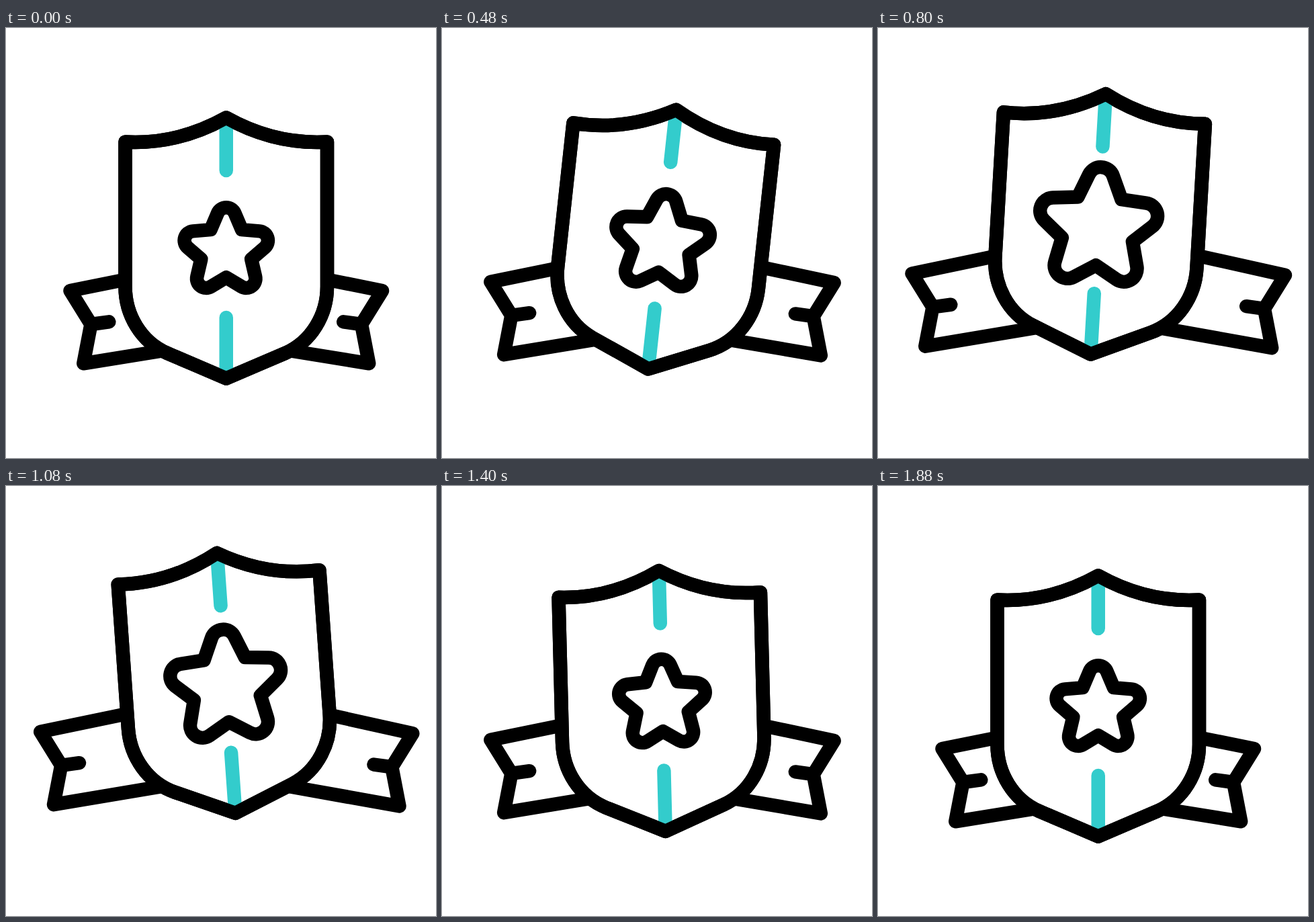
Recreate the animation shown at these times as an HTML page. Size 640 by 640 pixels, loop 1960 ms.

```html
<!DOCTYPE html>
<html lang="en">
<head>
<meta charset="utf-8">
<title>Shield badge</title>
<style>
  html, body { margin: 0; width: 100%; height: 100%; overflow: hidden; background: #fff; }
  svg { display: block; width: 100%; height: 100%; }
  .ink { stroke: #000; fill: #fff; }
  .line { fill: none; }
  .accent { stroke: #3cc; fill: none; }
</style>
</head>
<body>
<svg viewBox="0 0 640 640" stroke-width="20.5" stroke-linecap="round" stroke-linejoin="round">
  <path id="left" class="ink line"/>
  <path id="right" class="ink line" transform="matrix(-1 0 0 1 655.5 0)"/>
  <g id="shield">
    <path id="body" class="ink"/>
    <path class="accent" d="M0-182V-115.500M0 103.500V182"/>
    <path id="outline" class="ink line"/>
    <path id="star" class="ink"/>
  </g>
</svg>
<script>
const LOOP = 1960, STEP = 40;
const CX = 327.75, CY = 327.5;
const set = (id, name, value) => document.getElementById(id).setAttribute(name, value);

const shieldPath = 'M0-194C-44.750-169-96.750-155-150.250-158V57.500' +
  'C-150.250 99.500-126.750 139.500-87.750 156.500L0 194 87.750 156.500' +
  'C126.750 139.500 150.250 99.500 150.250 57.500V-158C96.750-155 44.750-169 0-194Z';
set('body', 'd', shieldPath);
set('outline', 'd', shieldPath);

// Ease in and out along cubic-bezier(.5, 0, .5, 1)
function ease(x) {
  let lo = 0, hi = 1;
  for (let i = 0; i < 24; i++) {
    const s = (lo + hi) / 2;
    if (1.5 * s * (1 - s) + s * s * s < x) lo = s; else hi = s;
  }
  return lo * lo * (3 - 2 * lo);
}

// keys: [time, value] pairs in order of time
function tween(t, ...keys) {
  if (t <= keys[0][0]) return keys[0][1];
  for (let i = 1; i < keys.length; i++) {
    const [t0, v0] = keys[i - 1], [t1, v1] = keys[i];
    if (t < t1) return v0 + (v1 - v0) * ease((t - t0) / (t1 - t0));
  }
  return keys[keys.length - 1][1];
}

// The hidden inner ends rise a little more than the tail
function bandPath(out, up, innerUp) {
  const at = (x, y, rise = up) => `${x - out} ${y - rise}`;
  const notch = at(126.5, 441);
  return `M${at(250, 360, innerUp)}L${at(95.5, 391)}L${notch}L${at(115.3, 499.3)}` +
    `L${at(300, 469.5, innerUp)}M${notch}L${at(153.3, 437.3)}`;
}

// Scaled outline with a constant line weight
function starPath(scale) {
  const at = (x, y, turn) => {
    const c = Math.cos(turn), s = Math.sin(turn);
    return [x * c - y * s, x * s + y * c + 4.4].map(v => (v * scale).toFixed(2)).join(' ');
  };
  const r = 13.9 * scale;
  let d = '';
  for (let k = 0; k < 5; k++) {
    const turn = k * Math.PI * 2 / 5;
    d += `${k ? 'L' : 'M'}${at(-12.8, -56.2, turn)}A${r} ${r} 0 0 1 ${at(12.8, -56.2, turn)}` +
      `L${at(23.1, -31.8, turn)}`;
  }
  return d + 'Z';
}

function draw(t) {
  const spread = tween(t, [40, 0], [920, 1], [1880, 0]);
  const lift = tween(t, [160, 0], [920, 37.1], [1640, 0]);
  const tilt = tween(t, [160, 0], [600, 7.1], [1080, -4.05], [1640, 0]);
  const scale = tween(t, [240, 1], [840, 1.41], [1560, 1]);
  set('left', 'd', bandPath(46.3 * spread, 26.3 * spread, 27.5 * spread));
  set('right', 'd', bandPath(47.3 * spread, 23.8 * spread, 27.2 * spread));
  set('shield', 'transform', `translate(${CX} ${CY - lift}) rotate(${tilt})`);
  set('star', 'd', starPath(scale));
}

const start = performance.now();
function tick() {
  const t = (performance.now() - start) % LOOP;
  draw(Math.floor(t / STEP) * STEP);
  requestAnimationFrame(tick);
}
tick();
</script>
</body>
</html>
```
